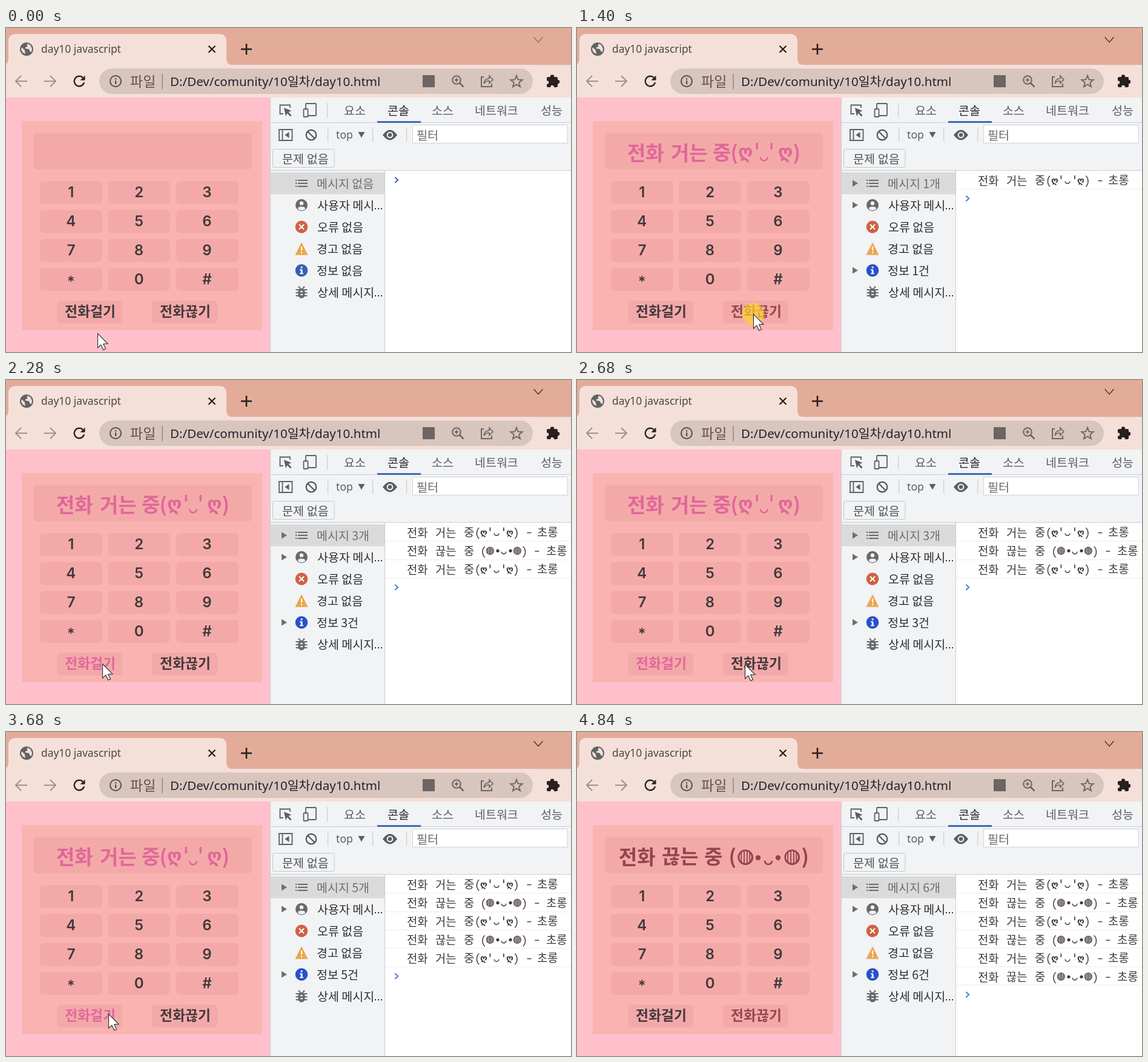
An HTML page with a canvas that plays this animation: 933 px wide and 536 px high, repeating every 5830 ms.

```html
<!DOCTYPE html>
<html lang="ko">
<head>
<meta charset="utf-8">
<title>day10 javascript</title>
<style>
html, body { margin: 0; width: 100%; height: 100%; overflow: hidden; }
canvas { display: block; width: 100vw; height: 100vh; }
</style>
</head>
<body>
<canvas id="c"></canvas>
<script>
const W = 933, H = 536, LOOP = 5830;
const cv = document.getElementById('c'), g = cv.getContext('2d');
const dpr = window.devicePixelRatio || 1;
cv.width = Math.round(W * dpr);
cv.height = Math.round(H * dpr);

const KR = "'Noto Sans CJK KR','Noto Sans CJK JP','Noto Sans CJK',sans-serif";
const LATIN = "'Noto Sans','Open Sans'," + KR;
const MONO = "'Noto Sans Mono CJK KR'," + KR;
const SYM = "'DejaVu Sans',sans-serif";
const GREY = '#5f6368', SOFT = '#6e6e6e', TINT = '#f5e0d9';

// press and release times; even entries dial, odd entries hang up
const clicks = [[330, 600], [1400, 1530], [2150, 2280], [2810, 2880], [3610, 3680], [4500, 4570]];
// pointer moves: start, end, steps, x, y
const moves = [
  [0, 70, 1, 151, 439], [70, 140, 1, 145, 457], [670, 870, 3, 291, 473],
  [1600, 1950, 5, 159, 469], [2280, 2680, 6, 277, 470],
  [2880, 3210, 5, 169, 466], [3680, 3970, 4, 296, 475]
];

function rect(x, y, w, h, col, r = 0) {
  g.fillStyle = col;
  g.beginPath();
  g.roundRect(x, y, w, h, r);
  g.fill();
}
function disc(x, y, r, col) {
  g.fillStyle = col;
  g.beginPath();
  g.arc(x, y, r, 0, 7);
  g.fill();
}
function ring(x, y, r, col, w) {
  g.strokeStyle = col;
  g.lineWidth = w;
  g.beginPath();
  g.arc(x, y, r, 0, 7);
  g.stroke();
}
function trace(p, closed) {
  g.beginPath();
  for (let i = 0; i < p.length; i += 2) g.lineTo(p[i], p[i + 1]);
  if (closed) g.closePath();
}
function line(p, col, w = 1) {
  trace(p);
  g.strokeStyle = col;
  g.lineWidth = w;
  g.stroke();
}
function poly(p, col) {
  trace(p, true);
  g.fillStyle = col;
  g.fill();
}
function box(x, y, w, h, col, lw, r = 0) {
  g.strokeStyle = col;
  g.lineWidth = lw;
  g.beginPath();
  g.roundRect(x, y, w, h, r);
  g.stroke();
}
// place text by its ink: left edge (or centre) at x, middle at y
function put(s, x, y, font, col, mid) {
  g.font = font;
  g.fillStyle = col;
  const m = g.measureText(s);
  const l = m.actualBoundingBoxLeft, r = m.actualBoundingBoxRight;
  g.fillText(s, mid ? x + (l - r) / 2 : x + l,
    y + (m.actualBoundingBoxAscent - m.actualBoundingBoxDescent) / 2);
}
const label = (s, x, y, col = '#333639', size = 19.7) => put(s, x, y, '300 ' + size + 'px ' + KR, col);

function globe(x, y) {
  disc(x, y, 11, GREY);
  poly([x - 8, y - 3, x - 3, y + 2, x - 2, y + 8, x - 7, y + 5, x - 9, y], TINT);
  poly([x + 1, y - 9, x + 6, y - 7, x + 9, y - 1, x + 8, y + 5, x + 5, y + 3, x + 4, y, x - 2, y - 1, x - 2, y - 3, x + 1, y - 4], TINT);
}
function tabFoot(x, dir) {
  g.fillStyle = TINT;
  g.beginPath();
  g.moveTo(x, 51);
  g.quadraticCurveTo(x, 61, x + dir * 10, 61);
  g.lineTo(x, 61);
  g.fill();
}
function browser(t) {
  rect(0, 0, W, 61, '#e3ac99');
  rect(0, 61, W, 54, TINT);
  rect(4, 10, 360, 60, TINT, 10);
  tabFoot(4, -1);
  tabFoot(364, 1);
  globe(34, 35);
  put('day10 javascript', 58, 36, '17.4px ' + LATIN, '#4a4543');
  line([334.5, 29.5, 345.5, 40.5], '#27211f', 2.3);
  line([345.5, 29.5, 334.5, 40.5], '#27211f', 2.3);
  line([388, 35, 406, 35], '#27211f', 2.6);
  line([397, 26, 397, 44], '#27211f', 2.6);
  line([871.5, 15, 879, 23.5, 886.5, 15], t < 600 ? '#8f6d63' : '#3a2c28', 1.2);

  const pale = '#9b918e';
  line([35, 88, 16, 88], pale, 2);
  line([25, 79, 16, 88, 25, 97], pale, 2);
  line([63, 88, 82, 88], pale, 2);
  line([73, 79, 82, 88, 73, 97], pale, 2);
  g.beginPath();
  g.arc(121, 88, 8.3, .25, 5.5);
  g.strokeStyle = '#27211f';
  g.lineWidth = 2.4;
  g.stroke();
  poly([130.5, 78.5, 130.5, 86.5, 122.5, 86.5], '#27211f');

  rect(154, 67, 716, 42, '#d8c5bc', 21);
  ring(181, 88, 9, '#544d4b', 2);
  rect(180, 87, 2.2, 6, '#544d4b');
  rect(180, 83, 2.2, 2.4, '#544d4b');
  label('파일', 205, 88, '#6b4f49', 23);
  rect(257.5, 76, 1.3, 25, '#8a7d78');
  put('D:/Dev/comunity/10일차/day10.html', 273, 89, '20.56px ' + LATIN, '#232034');

  const ic = '#6d6563';
  rect(688, 78, 20, 20, ic);
  ring(744, 86, 6.8, ic, 2);
  line([749, 91, 755.5, 97.5], ic, 2.6);
  line([740.8, 86, 747.2, 86], ic, 1.8);
  line([744, 82.8, 744, 89.2], ic, 1.8);
  line([789, 81, 785, 81, 785, 97, 802, 97, 802, 92], ic, 2);
  g.beginPath();
  g.moveTo(789, 92);
  g.quadraticCurveTo(790, 84, 798, 83.5);
  g.lineTo(798, 79);
  g.lineTo(804, 85.5);
  g.lineTo(798, 91.5);
  g.lineTo(798, 87.5);
  g.quadraticCurveTo(792, 87.5, 789, 92);
  g.lineWidth = 1.6;
  g.stroke();
  const star = [];
  for (let i = 0; i < 10; i++) {
    const a = i * Math.PI / 5 - Math.PI / 2, r = i % 2 ? 4.4 : 10.2;
    star.push(843 + r * Math.cos(a), 89 + r * Math.sin(a));
  }
  trace(star, true);
  g.lineWidth = 1.9;
  g.stroke();
  const ink = '#27211f';
  rect(893, 81, 18, 17, ink, 2);
  disc(902, 80.5, 3.2, ink);
  disc(911, 89, 3.2, ink);
  disc(893.5, 90, 2.8, TINT);
  disc(902, 97.5, 2.8, TINT);
}

function smile(x, y, r, col, w) {
  g.beginPath();
  g.ellipse(x, y, r, r, 0, 0, Math.PI);
  g.strokeStyle = col;
  g.lineWidth = w;
  g.stroke();
}
function dialText(c, big) {
  put('전화', 84, 206, big, c);
  put('거는', 155, 206, big, c);
  put('중', 225, 206, big, c);
  put('(', 260, 207, big, c, true);
  for (const x of [278, 344]) put('ღ', x, 210, '700 30px ' + SYM, c, true);
  for (const x of [295.5, 319.5]) rect(x, 190, 3.4, 11, c, 1);
  smile(309, 213.5, 6, c, 2.6);
  put(')', 362, 207, big, c, true);
}
function hangText(c, big) {
  put('전화', 70, 206, big, c);
  put('끊는', 141, 206, big, c);
  put('중', 211, 206, big, c);
  put('(', 257, 207, big, c, true);
  for (const x of [278, 355]) {
    put('◍', x, 207, '700 33px ' + SYM, c, true);
    ring(x, 207, 11.2, c, 2.6);
  }
  for (const x of [299, 332]) disc(x, 208, 4.2, c);
  smile(316, 213, 6, c, 2.6);
  put(')', 376, 207, big, c, true);
}
function phone(focus, n) {
  rect(0, 115, 436, 421, '#ffc0cb');
  rect(26, 154, 397, 346, '#f9b4b1');
  const key = '#f4a9a9', ink = '#40393a', tones = ['#e0679a', '#93454c'];
  rect(46, 174, 360, 60, key, 5);
  [...'123456789*0#'].forEach((ch, i) => {
    const col = i % 3, row = i / 3 | 0, x = 56 + col * 112.5, y = 253 + row * 48;
    rect(Math.floor(x), y, 103, 38, key, 6);
    put(ch, x + 51.2, y + 17.6, "600 24px Inter,'Open Sans',sans-serif", ink, true);
  });
  ['전화걸기', '전화끊기'].forEach((s, i) => {
    const x = 84 + i * 157;
    rect(x, 451, 108, 38, key, 6);
    put(s, x + 54, 468, '700 22.8px ' + KR, focus === i ? tones[i] : ink, true);
  });
  const big = '900 33px ' + KR;
  if (n) n % 2 ? dialText(tones[0], big) : hangText(tones[1], big);
}

function logLine(i) {
  const y = 252 + i * 30.6, f = '300 18.8px ' + MONO, c = '#3c3c3c', d = i % 2 * 15;
  put('전화', 662, y, f, c);
  put(i % 2 ? '끊는' : '거는', 709, y, f, c);
  put('중', 756, y, f, c);
  put('(', 779 + i % 2 * 9.5, y + 1, f, c, true);
  if (i % 2) {
    for (const x of [799, 844]) {
      disc(x, y, 6.3, '#b5a6ac');
      put('◍', x, y, '17px ' + SYM, '#4a4148', true);
    }
    for (const x of [812, 833]) disc(x, y, 2.6, c);
    smile(822, y + 1.5, 3.8, c, 1.5);
  } else {
    for (const x of [789, 832]) put('ღ', x, y + 2, '700 14.5px ' + SYM, c, true);
    for (const x of [798.5, 821]) rect(x, y - 8, 1.7, 6, c);
    smile(810, y + 1.5, 3.8, c, 1.5);
  }
  put(')', 842 + d * .9, y + 1, f, c, true);
  rect(860.5 + d * .85, y, 7, 1.4, c);
  put('초롱', 877 + d, y, f, c);
  rect(626, Math.round(266.2 + i * 30.4), 307, 1, '#ececec');
}

function toolIcons() {
  const c = '#5c5f63';
  line([458, 142, 452.5, 142, 452.5, 127.5, 469, 127.5, 469, 132], c, 1.8);
  poly([459, 132, 471.5, 137, 466.5, 139, 471.5, 144.5, 469.5, 146.5, 464.5, 141, 462, 146], c);
  box(495, 125, 17, 20, c, 1.8, 1);
  rect(490, 133, 9, 15, '#f1f3f4');
  box(491.5, 134, 7, 13, c, 1.8, 1);
  box(451, 168, 21.5, 18, c, 1.8);
  line([456.5, 168, 456.5, 186], c, 1.8);
  poly([467.5, 172, 467.5, 182, 460.5, 177], c);
  ring(504, 177, 8.3, c, 2.4);
  line([498, 171, 510, 183], c, 2.4);
  put('top', 545, 178, '17.7px ' + LATIN, c);
  poly([581.5, 172, 592.5, 172, 587, 181.5], c);
  g.fillStyle = c;
  g.beginPath();
  g.moveTo(622, 177);
  g.quadraticCurveTo(634, 160, 646, 177);
  g.quadraticCurveTo(634, 194, 622, 177);
  g.fill();
  disc(634, 177, 5.3, '#f1f3f4');
  disc(634, 177, 3.3, c);
}

function sideIcons(t) {
  const c = '#68696b', x = 488;
  for (const y of [252, 257, 262]) {
    rect(478, y - 1, 2.4, 2, c);
    rect(482, y - 1, 16, 2, c);
  }
  disc(x, 293, 10, c);
  disc(x, 290, 3.2, '#f1f3f4');
  g.beginPath();
  g.ellipse(x, 298.6, 6, 3.2, 0, 0, 7);
  g.fill();
  disc(x, 329, 10.3, '#cf6243');
  line([484, 325, 492, 333], '#fff', 2);
  line([492, 325, 484, 333], '#fff', 2);
  poly([488, 354.5, 498.5, 375.5, 477.5, 375.5], '#e8a84c');
  rect(487, 361.5, 2.2, 7, '#fff');
  rect(487, 370.5, 2.2, 2.3, '#fff');
  if (t < 600 || t >= 740) {
    disc(x, 401, 10.3, t < 600 ? '#3560b4' : '#2750cc');
    rect(486.7, 394.5, 2.8, 2.8, '#fff');
    rect(486.7, 399.3, 2.8, 7.5, '#fff');
    rect(485, 399.3, 3, 1.5, '#fff');
    rect(485, 405.5, 6.2, 1.6, '#fff');
  }
  rect(482.5, 430.5, 11, 16.5, c, 5.5);
  for (const y of [433, 438, 443]) rect(478.5, y - 1, 19, 2, c);
  line([483, 427.5, 486, 431], c, 2);
  line([493, 427.5, 490, 431], c, 2);
  rect(486, 435, 4, 2, '#f1f3f4');
  rect(486, 440, 4, 2, '#f1f3f4');
}

function devtools(t, n) {
  const edge = '#cbcdd1';
  rect(436, 115, 497, 421, '#f1f3f4');
  rect(436, 115, 1, 421, edge);
  rect(437, 156, 496, 1, edge);
  [['요소', 558], ['콘솔', 630], ['소스', 703], ['네트워크', 775], ['성능', 883]].forEach(([s, x], i) =>
    label(s, x, 136, i === 1 ? '#26282b' : '#5b5e62', 19.5));
  rect(613, 154, 72, 3, '#3d69b7');
  rect(530, 124, 1.2, 24, edge);
  for (const x of [531, 605, 661]) rect(x, 164, 1.2, 24, edge);
  toolIcons();
  rect(672, 161, 255, 30, '#fff');
  box(671.5, 160.5, 255.5, 30, '#d0d2d5', 1);
  label('필터', 679, 177, '#6b6b6b');
  box(440.5, 200.5, 101.5, 30, '#c6c9cd', 1, 2);
  label('문제 없음', 456, 216, '#515458');
  rect(437, 235, 496, 1, edge);

  rect(626, 236, 307, 300, '#fff');
  rect(437, 239, 188, 36, '#dadada');
  rect(625, 236, 1, 300, edge);
  sideIcons(t);
  const rows = [n ? '메시지 ' + n + '개' : '메시지 없음', '사용자 메시', '오류 없음', '경고 없음',
    n ? '정보 ' + n + '건' : '정보 없음', '상세 메시지'];
  rows.forEach((s, i) => {
    const y = 257 + i * 36;
    label(s, 514, y, i ? '#2e3033' : SOFT, 19.5);
    if (i === 1 || i === 5) for (let k = 0; k < 3; k++) rect(609 + k * 5, y + 5, 2, 2, '#2e3033');
    if (n && (i < 2 || i === 4)) poly([455, y - 5.5, 464, y, 455, y + 5.5], SOFT);
  });
  for (let i = 0; i < n; i++) logLine(i);
  const y = 251.5 + n * 30.5;
  line([642.3, y - 4.5, 647.2, y, 642.3, y + 4.5], t < 600 ? '#3d62b0' : '#4a7fd8', 2);
}

function pointer(t) {
  let x = 151, y = 505;
  for (const [a, b, n, tx, ty] of moves) {
    if (t < a) break;
    const u = Math.min(1, Math.floor((t - a) / (b - a) * n + 1e-6) / n);
    const e = u * u * (3 - 2 * u);
    x += (tx - x) * e;
    y += (ty - y) * e;
  }
  return [x, y];
}
function arrow(x, y) {
  const p = [0, 0, 0, 23.5, 5.3, 18.7, 9.3, 27, 13, 25.3, 9.2, 17.3, 16.5, 16.8];
  trace(p.map((v, i) => v + (i % 2 ? y : x) + .5), true);
  g.fillStyle = '#fff';
  g.fill();
  g.strokeStyle = '#2a2a2a';
  g.lineWidth = 1.1;
  g.stroke();
}

function draw(t) {
  g.setTransform(cv.width / W, 0, 0, cv.height / H, 0, 0);
  const pressed = clicks.filter(c => t >= c[0]).length;
  const done = clicks.filter(c => t >= c[1]).length;
  browser(t);
  phone(pressed ? (pressed - 1) % 2 : -1, done);
  devtools(t, done);
  if (t >= 4840) return;
  const [x, y] = pointer(t);
  if (pressed > done) disc(x, y, 18, 'rgba(255,215,40,.68)');
  arrow(x, y);
}

const start = performance.now();
function tick() {
  draw((performance.now() - start) % LOOP);
  requestAnimationFrame(tick);
}
tick();
</script>
</body>
</html>
```
